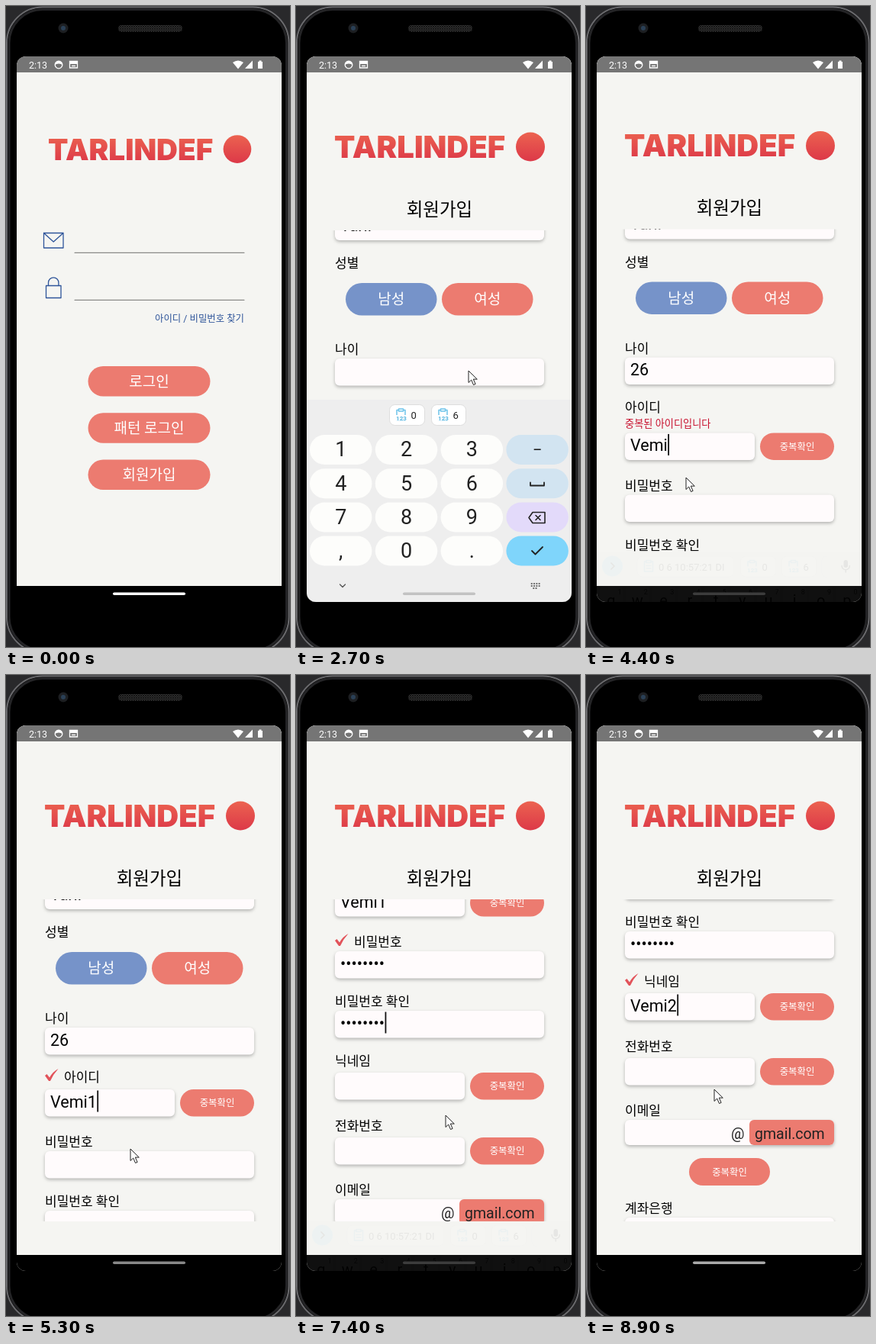
An HTML page that plays this animation: 372x840 px, repeating every 9 s.

```html
<!DOCTYPE html>
<html lang="ko">
<head>
<meta charset="utf-8">
<style>
html, body { margin: 0; width: 100%; height: 100%; overflow: hidden; background: #29292b; }
svg { display: block; width: 372px; height: 840px; font-family: Roboto, "Noto Sans CJK KR", sans-serif; }
text { white-space: pre; }
.field { fill: #fffbfc; filter: drop-shadow(0 2px 2px #0004); }
.line { fill: none; stroke-linecap: round; stroke-linejoin: round; }
</style>
</head>
<body>
<svg viewBox="0 0 372 840">
  <defs>
    <linearGradient id="red" gradientUnits="userSpaceOnUse" x1="0" y1="165" x2="0" y2="204">
      <stop stop-color="#ec6350"/><stop offset="1" stop-color="#dc3848"/>
    </linearGradient>
    <pattern id="mesh" width="3" height="3" patternUnits="userSpaceOnUse">
      <rect width="3" height="3" fill="#303030"/><path d="M0 0l3 3M3 0l-3 3" stroke="#151515"/>
    </pattern>
    <clipPath id="screen"><rect x="14" y="66" width="347" height="715" rx="12"/></clipPath>
    <clipPath id="list"><rect x="14" y="294" width="347" height="422"/></clipPath>
  </defs>
  <rect x="1" y="1.5" width="369.5" height="846" rx="47" stroke="#6a6a6d" stroke-width="2"/>
  <rect x="4" y="4.5" width="363.5" height="840" rx="44" stroke="#242426" stroke-width="3"/>
  <circle cx="75" cy="29" r="6.5" fill="#1d1f22"/>
  <circle cx="75" cy="29" r="3" fill="#2a4056"/>
  <rect x="147" y="25" width="84" height="9" rx="4.5" fill="url(#mesh)"/>
  <g clip-path="url(#screen)">
    <rect x="14" y="66" width="347" height="694" fill="#f5f5f2"/>
    <g id="app"></g>
    <path d="M14 66h347v21H14z" fill="#757575"/>
    <g fill="#fff">
      <text x="30" y="81.5" font-size="12.5">2:13</text>
      <path d="M297 74q7-5 14 0l-7 8.500zM313 82h10V71.500zM330 73h1.500v-1.500h3V73h1.500v9h-6z"/>
      <path d="M64 77a5 5 0 0 1 10 0q-5-3-10 0zM83 72h11v4H83z"/>
      <g fill="none" stroke="#fff" stroke-width="1.3">
        <circle cx="69" cy="77" r="4.800"/><path d="M83.500 72.500h10v8.500h-10zM86 78.500h5"/>
      </g>
    </g>
    <g id="keys"></g>
  </g>
  <rect id="pill" x="140" y="768.500" width="95" height="3.500" rx="1.750"/>
  <path id="mouse" d="M0 0v15.500l3.700-3.500 2.800 6.500 2.600-1.100-2.800-6.300h5z" fill="#fff" stroke="#222"/>
</svg>
<script>
const $ = id => document.getElementById(id);
const pen = document.createElement('canvas').getContext('2d');
const CORAL = '#ec7b70', BLUE = '#7693c9', NAVY = '#2f559a', SKY = '#7fd5fb', PALE = '#d2e4f1';
const MID = 'text-anchor="middle"', BOLD = 'font-weight="500"';
const clamp = v => Math.max(0, Math.min(1, v));

const text = (x, y, size, str, attr = '') => `<text x="${x}" y="${y}" font-size="${size}" ${attr}>${str}</text>`;
const box = (x, y, w, h, r, fill, attr = '') =>
  `<rect x="${x}" y="${y}" width="${w}" height="${h}" rx="${r}" fill="${fill}" ${attr}/>`;
const line = (d, color, width = 1.3) => `<path class="line" d="${d}" stroke="${color}" stroke-width="${width}"/>`;
const button = (x, y, w, h, size, str, fill = CORAL, attr = '') =>
  box(x, y, w, h, h / 2, fill) + text(x + w / 2, y + h / 2 + size * .37, size, str, `${MID} fill="#fff" ${attr}`);

// Eased value along [time, value, value...] points
function along(points, t) {
  const i = points.findIndex(p => p[0] > t);
  if (i < 0) return points.at(-1).slice(1);
  if (!i) return points[0].slice(1);
  const [a, b] = [points[i - 1], points[i]];
  const k = (t - a[0]) / (b[0] - a[0]), s = k * k * (3 - 2 * k);
  return a.slice(1).map((v, j) => v + (b[j + 1] - v) * s);
}

// Screens
const logo = text(50, 199, 40, 'TARLINDEF', 'font-family="Inter, sans-serif" font-weight="900" fill="url(#red)"') +
  '<circle cx="307" cy="184.500" r="19" fill="url(#red)"/>';

const login = `<g transform="translate(6.700 9.500) scale(.965)">${logo}</g>` +
  line('M49.500 297.500h25.500v19.500h-25.500zl12.700 11.500 12.800-11.500M52.500 366.500h19.500v16h-19.500zM55.500 366v-3.500a6.700 6.700 0 0 1 13.400 0v3.500', NAVY) +
  line('M90 323.300h222M90 385.300h222', '#8a8a88', 1.2) +
  text(312, 414, 12.4, '아이디 / 비밀번호 찾기', `text-anchor="end" fill="${NAVY}"`) +
  ['로그인', '패턴 로그인', '회원가입'].map((s, i) => button(107.5, 472 + 61.3 * i, 160, 39.5, 19, s)).join('');

function label(y, str, ok) {
  const tick = `<path transform="translate(51 ${y - 11})" d="M0 9l2.500-2 3.500 4.500Q10 4 17.500 0Q11 7 7 16H5z" fill="#e2535a"/>`;
  return (ok ? tick : '') + text(ok ? 76 : 51, y + 6.3, 17, str, BOLD);
}

function field(y, w, str = '', caret = false) {
  pen.font = '21.500px Roboto, sans-serif';
  const x = 58.5 + pen.measureText(str).width;
  return box(51, y, w, 35.5, 6, '', 'class="field"') + text(58, y + 23.5, 21.5, str) +
    (caret ? box(x, y + 1.5, 1.8, 28, 0, '#111') : '');
}

const check = y => button(228, y, 97, 35.5, 12.4, '중복확인', CORAL, BOLD);
const typed = (t, str, start, step = 100) => str.slice(0, Math.max(0, Math.floor((t - start) / step) + 1));
const dots = '•'.repeat(8);

function signup(t) {
  const on = (a, b = 9000) => t >= a && t < b;
  const error = on(4200, 5000), gap = error ? 18 : 0;
  const [scroll] = along([[2300, 0], [2500, 47], [6300, 47], [6600, 309], [7500, 309], [7800, 413]], t);
  const top = label(306, '이름', on(1200)) + field(318.5, 274, typed(t, 'Tarli', 1100), on(1000, 2200)) +
    label(384, '성별') + button(65, 410, 119.5, 42.5, 19, '남성', on(1700) ? BLUE : CORAL) +
    button(191, 410, 119.5, 42.5, 19, '여성') +
    label(497, '나이') + field(509, 274, typed(t, '26', 2900), on(2800, 3500)) +
    label(574, '아이디', on(5000)) +
    (error ? text(51, 600.5, 13.2, '중복된 아이디입니다', 'fill="#c8102e"') : '');
  const id = typed(t, 'Vemi', 3700) + (on(4800) ? '1' : '');
  const rest = field(590, 170, id, on(3500, 5500)) + check(590) +
    label(659, '비밀번호', on(7200)) + field(671, 274, typed(t, dots, 5750, 50), on(5500, 6700)) +
    label(737, '비밀번호 확인') + field(749, 274, typed(t, dots, 6850, 50), on(6700, 7900)) +
    label(815, '닉네임', on(8600)) + field(830, 170, typed(t, 'Vemi2', 8200), on(7900)) + check(830) +
    label(900, '전화번호') + field(915, 170) + check(915) +
    label(984, '이메일') + box(51, 996, 274, 33, 6, '', 'class="field"') + box(214, 996, 111, 33, 6, CORAL) +
    text(190, 1020.5, 19.5, '@', 'fill="#222"') + text(221, 1020.5, 19.5, 'gmail.com', 'fill="#222"') +
    button(135, 1046, 106, 36, 12.4, '중복확인', CORAL, BOLD) +
    label(1112, '계좌은행') + field(1124, 274);
  return box(14, 66, 347, 900, 0, '#f5f5f2') + logo + text(188, 275, 23.5, '회원가입', `${MID} ${BOLD}`) +
    `<g clip-path="url(#list)"><g transform="translate(0 ${-scroll})">${top}<g transform="translate(0 ${gap})">${rest}</g></g></g>`;
}

// Keyboards
const INK = '#222';
const key = (x, y, w, str, fill = '#fdfdfb', h = 37, r = 6, size = 20) =>
  box(x, y, w, h, r, fill) + text(x + w / 2, y + h / 2 + size * .33, size, str, `${MID} fill="${INK}"`);
const chip = (x, w, str, num = true) => box(x, 522.5, w, 27, 7, '#fff', 'stroke="#ddd"') +
  line(`M${x + 12} 529.500h-2.500v13h11v-13h-2.500M${x + 12} 528h6v3h-6z` + (num ? '' : `M${x + 12} 535h6M${x + 12} 538.500h6`), '#6fc4ea', 1.5) +
  (num ? box(x + 8, 536, 15, 7, 0, '#fff') + text(x + 15.5, 543, 8, '123', `${MID} fill="#55b5e0" font-weight="700"`) : '') +
  text(x + 28, 541, 13, str, `fill="${INK}"`);
const erase = (x, y) => line(`M${x - 11} ${y}l5-7h16v14h-16zM${x - 2} ${y - 3}l6 6m0-6l-6 6`, INK, 1.6);
const tickKey = (x, y) => line(`M${x - 7} ${y}l4.500 4.500 9.500-9.500`, INK, 1.8);
const base = box(14, 516, 347, 266, 0, '#eeeeee') + line('M57.500 758l3.500 3.500 3.500-3.500', '#555') +
  line('M308.500 757h11.500M308.500 760h11.500M311 763h6.500', '#666', 1.8).replace('/>', ' stroke-dasharray=".5 2.800"/>');
const PITCH = 34.33;
const row = (str, x, y) => [...str].map((c, i) => key(x + PITCH * i, y, 30, c)).join('');

const qwerty = base + `<circle cx="34.500" cy="535.500" r="13.500" fill="${SKY}"/>` + line('M33 531.500l4 4-4 4', INK, 1.7) +
  chip(67, 127, '0 6 10:57:21 DI', false) + chip(202.5, 46, '0') + chip(256.5, 45, '6') +
  line('M316 522.500h-3q-4 0-4 5v17q0 5 4 5h3', '#ddd', 1) +
  box(337.5, 527.5, 5.5, 10, 2.7, INK) + line('M335 535a5.200 5.200 0 0 0 10.400 0M340.200 540.500v3', INK, 1.5) +
  row('qwertyuiop', 18, 562) + row('asdfghjkl', 35, 607) + row('zxcvbnm', 69, 652) +
  [...'1234567890'].map((c, i) => text(44 + PITCH * i, 572.5, 9, c, `${MID} fill="#444"`)).join('') +
  key(18, 652, 47, '', PALE) + line('M41 661.500l-9 9h5v7h8v-7h5z', INK, 1.6) +
  key(309, 652, 48, '', PALE) + erase(333, 670) +
  key(18, 696, 47, '?123', '#b3c9d3', 37, 18.5, 13) + key(69, 696, 30, '', PALE) +
  text(84, 725, 17, ',', MID) + '<circle cx="84" cy="707" r="4.500" fill="none" stroke="#333"/>' +
  line('M82 708.500q2 2 4 0M82.500 705.500v.1M85.500 705.500v.1', '#333', 1) +
  key(103, 696, 30, '') + line('M110 714.500a8 8 0 1 0 16 0a8 8 0 1 0-16 0M111 711.500h14M111 717.500h14M118 706.500q-7 8 0 16q7-8 0-16', INK, 1.4) +
  key(137, 696, 134, 'English', '#fdfdfb', 37, 6, 11.5) + key(275, 696, 30, '.', PALE) +
  key(309, 696, 48, '', SKY, 37, 18.5) + tickKey(333, 715);

const numpad = base + chip(122.5, 46, '0') + chip(177.5, 45, '6') +
  ['1', '2', '3', '−', '4', '5', '6', '', '7', '8', '9', '', ',', '0', '.', ''].map((c, i) => {
    const col = i % 4, r = i >> 2;
    const fill = col < 3 ? '#fdfdfb' : [PALE, PALE, '#e3dafa', SKY][r];
    return key(18 + 85.8 * col, 562 + 44.2 * r, 81.5, c, fill, 39, 19.5, col < 3 ? 27 : 22);
  }).join('') + line('M307 624.500v4h18v-4', INK, 1.8) + erase(316, 670.5) + tickKey(316, 714);

// [board, opens, closes, window pan]
const sessions = [
  [qwerty, 900, 2200, 0], [numpad, 2200, 3100, 0], [qwerty, 3500, 4200, 100], [qwerty, 4600, 5000, 100],
  [qwerty, 5500, 6200, 150], [qwerty, 6700, 7200, 0], [qwerty, 8000, 8600, 0]
];
const mousePath = [
  [100, 70, -20], [400, 190, 612], [600, 190, 612], [800, 150, 332], [1000, 150, 332], [1500, 168, 439],
  [1700, 145, 432], [1900, 145, 432], [2200, 228, 525], [2400, 226, 478], [3100, 226, 478], [3400, 130, 560],
  [3800, 130, 560], [4100, 270, 485], [4200, 270, 485], [4400, 131, 618], [4600, 135, 577], [4750, 135, 577],
  [4900, 270, 452], [5000, 270, 452], [5300, 163, 621], [5500, 160, 640], [6200, 170, 660], [6300, 170, 680],
  [6600, 170, 418], [6700, 170, 455], [7100, 170, 455], [7400, 196, 577], [7500, 196, 620], [7800, 190, 516],
  [7900, 150, 434], [8200, 150, 434], [8500, 270, 434], [8600, 270, 434], [8900, 168, 543]
];

function draw(t) {
  let pan = 0, keys = '', pill = t < 600 ? '#fff' : t >= 8800 ? '#aaa' : '#888';
  for (const [board, open, close, shift] of sessions) {
    const level = t < close ? clamp((t - open) / 267) : clamp(1 - (t - close) / 267);
    if (!level) continue;
    pan += shift * level ** 3;
    keys += `<g transform="translate(0 ${265 * (1 - level)})" opacity="${level ** 2}">${board}</g>`;
    pill = board === numpad ? '#c2c2c2' : '#3c3c3c';
  }
  const fade = clamp((t - 400) / 300);
  $('app').innerHTML = (fade < 1 ? login : '') +
    (fade ? `<g opacity="${fade}"><g transform="translate(0 ${-pan})">${signup(t)}</g></g>` : '') +
    box(14, 760, 347, 22, 0, '#000');
  $('keys').innerHTML = keys;
  $('pill').setAttribute('fill', pill);
  $('mouse').setAttribute('transform', `translate(${along(mousePath, t)})`);
}

// The picture advances in steps of a tenth of a second
let last = -1;
function tick() {
  const t = Math.floor(performance.now() % 9000 / 100) * 100;
  if (t !== last) draw(last = t);
  requestAnimationFrame(tick);
}
tick();
</script>
</body>
</html>
```
